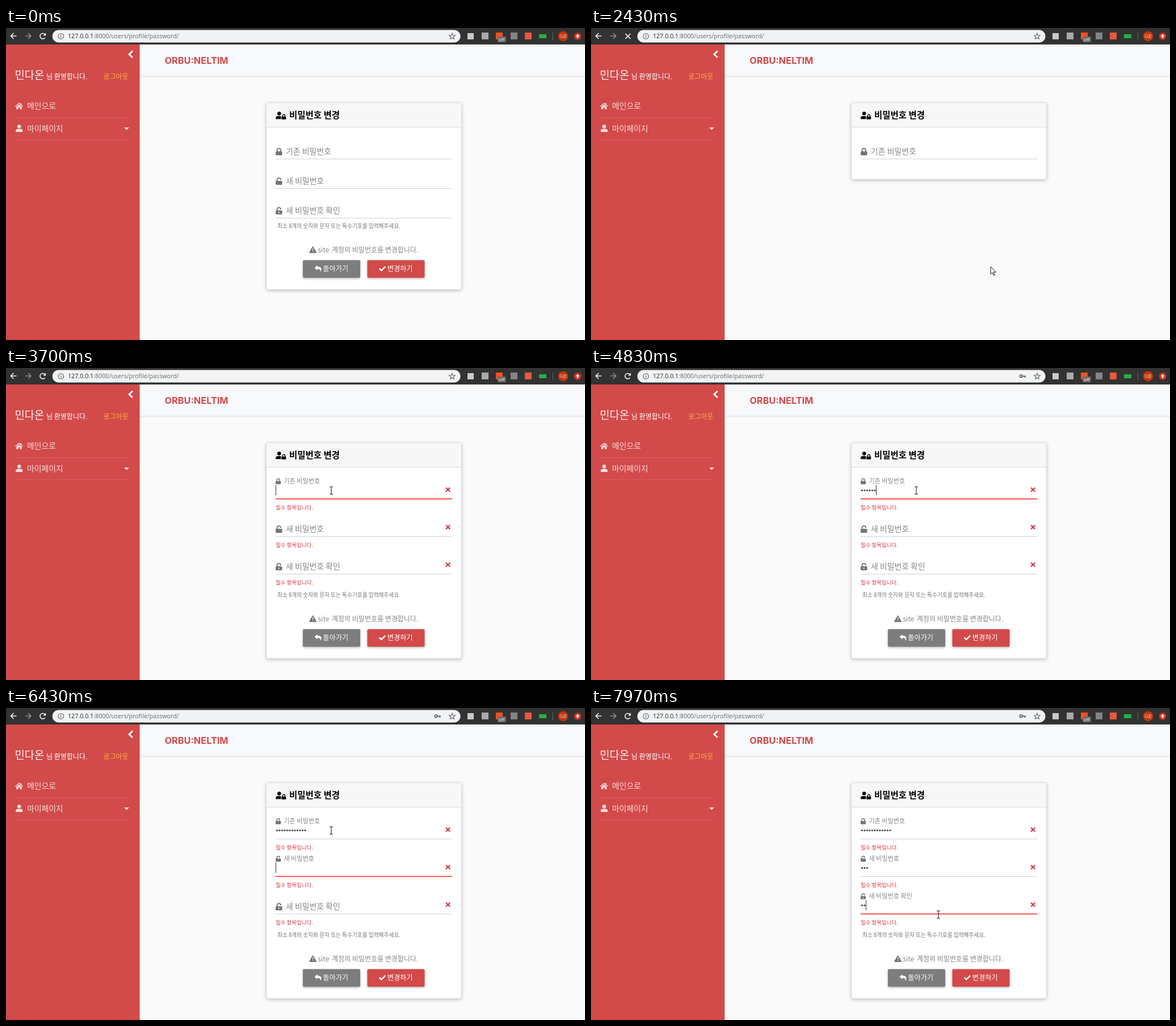
Recreate the animation shown at these times as an HTML page with a canvas. Size 1020 by 549 pixels, loop 8000 ms.

```html
<!DOCTYPE html>
<html lang="ko">
<head>
<meta charset="utf-8">
<title>비밀번호 변경</title>
<style>
html, body { margin: 0; width: 100%; height: 100%; overflow: hidden; background: #fafafa; }
canvas { display: block; }
</style>
</head>
<body>
<canvas id="stage" width="1020" height="549"></canvas>
<script>
const ctx = document.getElementById('stage').getContext('2d');
const LOOP = 8000, TICK = 1000 / 15;
const KR = '"Noto Sans CJK KR", "Noto Sans KR", "Noto Sans CJK", sans-serif';
const LATIN = '"Open Sans", "Noto Sans", sans-serif';
const RED = '#d24a4a', GREY = '#757575', LABEL = '#868686', ERROR = '#dc3545';
const SOFT = 'rgba(255,255,255,.8)';

// timeline, in ms
const FOCUS = [3440, 6140, 7140];
const TYPED = [
  [4030, 4170, 4230, 4370, 4430, 4830, 4970, 5170, 5300, 5370, 5500, 5770],
  [6770, 6830, 6900],
  [7900, 7970]
];
const LABELS = ['기존 비밀번호', '새 비밀번호', '새 비밀번호 확인'];
const POINTER = [
  [503, 954, 460], [968, 704, 420], [2703, 704, 420], [3103, 570, 233],
  [3300, 573, 215.5], [7437, 573, 215.5], [7903, 612, 363.5]
];

const clamp = v => Math.max(0, Math.min(1, v));
const span = (t, from, len) => clamp((t - from) / len);
const easeOut = p => 1 - (1 - p) * (1 - p);
const smooth = p => p * p * (3 - 2 * p);
const mix = (a, b, p) => a + (b - a) * p;

function text(str, x, y, size, color, weight = 400, family = KR, align = 'left') {
  ctx.font = `${weight} ${size}px ${family}`;
  ctx.textAlign = align;
  ctx.fillStyle = color;
  ctx.fillText(str, x, y);
}

function rect(x, y, w, h, color) {
  ctx.fillStyle = color;
  ctx.fillRect(x, y, w, h);
}

function round(x, y, w, h, r, color, shadow) {
  ctx.save();
  if (shadow) {
    ctx.shadowOffsetY = shadow[0];
    ctx.shadowBlur = shadow[1];
    ctx.shadowColor = `rgba(0,0,0,${shadow[2]})`;
  }
  ctx.beginPath();
  ctx.roundRect(x, y, w, h, r);
  ctx.fillStyle = color;
  ctx.fill();
  ctx.restore();
}

function disc(x, y, r, color) {
  ctx.beginPath();
  ctx.arc(x, y, r, 0, 7);
  ctx.fillStyle = color;
  ctx.fill();
}

// fills, strokes or does both with one SVG path
function shape(d, x, y, fill, stroke, width = 1, join = 'miter') {
  const path = new Path2D(d);
  ctx.save();
  ctx.translate(x, y);
  ctx.lineJoin = join;
  ctx.lineWidth = width;
  if (fill) { ctx.fillStyle = fill; ctx.fill(path); }
  if (stroke) { ctx.strokeStyle = stroke; ctx.stroke(path); }
  ctx.restore();
}

function lock(x, y, kind, color) {
  const end = kind ? 'V4.6' : 'V6.5';
  shape('M2.6 6.5V4.1A3.1 3.1 0 0 1 8.9 4.1' + end, x, y, null, color, 1.9);
  round(x, y + 6, 11.5, 7, 1.3, color);
  if (kind === 2) round(x + 5, y + 8, 1.5, 3, .7, '#fff');
}

function person(x, y, color) {
  disc(x + 6.2, y + 3.3, 3.3, color);
  round(x, y + 7.6, 12.4, 5.4, [3.8, 3.8, 1.2, 1.2], color);
}

function browserBar(loading, key) {
  rect(0, 0, 1020, 29, '#323232');
  round(81.7, 3.4, 718.8, 22.2, 11.1, '#f1f3f4');
  shape('M18.5 14H9M13.5 9L8.5 14l5 5', 0, 0, null, '#f4f4f4', 1.6);
  shape('M34 14h9.5M39 9l5 5-5 5', 0, 0, null, '#8c8c8c', 1.6);
  if (loading) {
    shape('M60.5 10l9 9M69.5 10l-9 9', 0, 0, null, '#f4f4f4', 1.7);
  } else {
    shape('M68.6 17.2A4.8 4.8 0 1 1 68.2 10.9', 0, 0, null, '#f4f4f4', 1.6);
    shape('M70.2 8.6v5h-5z', 0, 0, '#f4f4f4');
  }
  ctx.beginPath();
  ctx.arc(96.8, 14.5, 4.8, 0, 7);
  ctx.strokeStyle = '#5f6368';
  ctx.lineWidth = 1.1;
  ctx.stroke();
  rect(96.2, 13.6, 1.2, 3.5, '#5f6368');
  rect(96.2, 11.6, 1.2, 1.2, '#5f6368');

  const host = '127.0.0.1';
  text(host, 109, 18.2, 10.7, '#26282b', 400, LATIN);
  const w = ctx.measureText(host).width;
  text(':8000/users/profile/password/', 109 + w, 18.2, 10.7, '#65696e', 400, LATIN);

  if (key) {
    ctx.beginPath();
    ctx.arc(757.6, 14.3, 2.2, 0, 7);
    ctx.strokeStyle = '#5f6368';
    ctx.lineWidth = 1.8;
    ctx.stroke();
    shape('M760 14.3h6M764.4 14v3', 0, 0, null, '#5f6368', 1.8);
  }
  let star = '';
  for (let i = 0; i < 10; i++) {
    const r = i % 2 ? 2.4 : 5.6, a = i * Math.PI / 5 - Math.PI / 2;
    star += (i ? 'L' : 'M') + r * Math.cos(a) + ' ' + r * Math.sin(a);
  }
  shape(star + 'Z', 786, 14.8, null, '#5f6368', 1.1);

  rect(813, 9, 11, 11, '#c9c9c9');
  rect(838, 8, 12, 12, '#a9a9a9');
  rect(863, 8, 12, 12, '#f4511e');
  round(866, 15, 14.5, 10, 1.5, '#6d6d6d');
  text('off', 873.2, 22.8, 8, '#fff', 400, LATIN, 'center');
  rect(889, 8, 12, 12, '#858585');
  rect(914, 8, 12, 12, '#e8593f');
  rect(939, 11, 13, 7, '#1fb141');
  rect(963, 8, 1, 13, '#6a6a6a');
  disc(981.5, 14.5, 9, '#bf360c');
  text('다온', 981.5, 17, 6.8, '#fff', 400, KR, 'center');
  disc(1007, 14.5, 6.3, '#d93025');
  shape('M1007 10.8l3.4 3.6h-2.1v3.4h-2.6v-3.4h-2.1z', 0, 0, '#fff');
}

function sidebar() {
  rect(0, 29, 235.5, 520, RED);
  shape('M223 40.5L217 46.3l6 5.8', 0, 0, null, '#fff', 2.8);
  text('민다온', 15.5, 89.8, 18.8, 'rgba(255,255,255,.92)', 300);
  text('님 환영합니다.', 71, 90, 12, '#fff');
  text('로그아웃', 171.5, 90, 12, '#ffb43c');
  shape('M0 6.5L7 .6l2.6 2.2V1.2h1.8v3.1L14 6.5l-.9 1L7 2.5.9 7.5z', 16, 131, SOFT);
  shape('M2.2 7.7L7 3.8l4.8 3.9V12H8.4V8.7H5.6V12H2.2z', 16, 131, SOFT);
  text('메인으로', 37, 142.3, 13.9, SOFT, 300);
  person(17, 170, SOFT);
  text('마이페이지', 37, 181.8, 13.9, SOFT, 300);
  shape('M208 175h9l-4.5 4.6z', 0, 0, SOFT);
  rect(16, 157, 200, 1, 'rgba(255,255,255,.12)');
  rect(16, 196, 200, 1, 'rgba(255,255,255,.12)');
}

function card(bottom) {
  const h = bottom - 132;
  round(458.5, 131.5, 344, h + 1, 3.5, '#dcdcdc', [1.5, 6, .25]);
  round(459.3, 132.3, 342.4, h - .6, 3, '#fff');
  round(459.3, 132.3, 342.4, 42, [3, 3, 0, 0], '#f7f7f7');
  rect(459.3, 174, 342.4, 1, '#dcdcdc');
  person(475, 147.3, '#000');
  round(484.2, 152.6, 9.6, 9, 1.5, '#f7f7f7');
  ctx.save();
  ctx.translate(485.2, 151.6);
  ctx.scale(.7, .7);
  lock(0, 0, 0, '#000');
  ctx.restore();
  text('비밀번호 변경', 499, 159, 15.5, '#000', 700);
}

function field(i, line, t, errors) {
  const lift = easeOut(span(t, FOCUS[i], 260));
  const leave = i < 2 ? span(t, FOCUS[i + 1], 260) : 0;
  const size = mix(1, .8, lift);

  rect(475, line - .5, 311, 1, '#ced2d6');
  const glow = lift - leave;
  if (glow > 0) {
    ctx.globalAlpha = glow;
    rect(475, line - 1, 311, 1.8, '#f44336');
    ctx.globalAlpha = 1;
  }

  ctx.save();
  ctx.translate(475, mix(line - 8.2, line - 27.3, lift));
  ctx.scale(size, size);
  lock(0, -11.4, i, GREY);
  text(LABELS[i], 18, 0, 13.9, LABEL, 300);
  ctx.restore();

  const count = TYPED[i].filter(k => k <= t).length;
  for (let n = 0; n < count; n++) disc(477.4 + n * 4.5, line - 15.2, 1.65, '#495057');
  const next = FOCUS[i + 1] || Infinity;
  if (t >= FOCUS[i] && t < next) rect(475 + count * 4.5, line - 24.5, 1, 18, '#333');

  if (errors) {
    shape('M-3.5-3.5l7 7M3.5-3.5l-7 7', 778.6, line - 16.5, null, ERROR, 2.3);
    text('필수 항목입니다.', 475, line + 18, 9.5, ERROR);
  }
}

function button(x, y, color, label, glyph, shadow) {
  round(x, y, 101, 31, 2, color, [1.5, 4, shadow]);
  glyph(x + 20.5, y + 9);
  text(label, x + 35.2, y + 19.3, 12.2, '#fff');
}

const reply = (x, y) => shape(
  'M0 4.5L5 0V2.6C9 2.6 12 3.5 12 7.5C12 9.5 11 10.5 10 11.2C10.8 7.5 9 6.5 5 6.5V9Z', x, y, '#fff');
const check = (x, y) => shape('M.8 5.8L4.3 9.2L11.2 2.4', x, y, null, '#fff', 2.5);

function footer(dy, t) {
  text('최소 8개의 숫자와 문자 또는 특수기호를 입력해주세요.', 478, 351.8 + dy, 9.68, '#70757a');
  shape('M540.6 385.4L546 395H535.2Z', 0, dy, GREY, GREY, 2, 'round');
  rect(540, 387.4 + dy, 1.3, 4, '#fff');
  rect(540, 392.6 + dy, 1.3, 1.4, '#fff');
  text('site', 549.5, 394.8 + dy, 12, LABEL);
  text('계정의 비밀번호를 변경합니다.', 574, 394.8 + dy, 12, LABEL);

  const y = 408.5 + dy, old = dy === 0;
  const hover = old ? span(t, 835, 135) : 0;
  button(523, y, '#7d7d7d', '돌아가기', reply, .28);
  button(636.5, y, RED, '변경하기', (x, top) => {
    if (old) press(y, t);
    check(x, top);
  }, .28 * (1 - hover));
}

function press(y, t) {
  if (t < 1430) return;
  const r = 110 * easeOut(span(t, 1400, 500));
  const g = ctx.createRadialGradient(704, 423, 0, 704, 423, r);
  g.addColorStop(0, 'rgba(255,255,255,.13)');
  g.addColorStop(.7, 'rgba(255,255,255,.17)');
  g.addColorStop(1, 'rgba(255,255,255,.02)');
  ctx.save();
  ctx.beginPath();
  ctx.roundRect(637, y + .5, 100, 30, 2);
  ctx.globalAlpha = 1 - span(t, 1730, 300);
  ctx.fillStyle = g;
  ctx.fill();
  ctx.globalAlpha = 1;
  ctx.strokeStyle = '#c03a40';
  ctx.lineWidth = 1;
  ctx.stroke();
  ctx.restore();
}

function pointer(t) {
  if (t < POINTER[0][0]) return;
  let i = POINTER.findIndex(k => k[0] > t) - 1;
  if (i < 0) i = POINTER.length - 1;
  const a = POINTER[i], b = POINTER[i + 1] || a;
  const p = smooth(span(t, a[0], b[0] - a[0] || 1));
  const x = mix(a[1], b[1], p), y = mix(a[2], b[2], p);
  const overInput = t > 2700 && [230.5, 296.5, 362.5].some(l => y > l - 27 && y < l + 1.5);
  if (overInput) {
    shape('M-3-6.5h2.2l.8.8.8-.8H3M0-6V6M-3 6.5h2.2l.8-.8.8.8H3', x, y, null, '#222', 1.1);
  } else {
    shape('M0 0V13.2L3 10.4L5.2 15.2L7.3 14.3L5.1 9.6H9.3Z', x, y, '#fff', '#111', 1);
  }
}

function draw(t) {
  const partial = t >= 2430 && t < 2500;
  const errors = t >= 2500;
  const dy = errors ? 51 : 0;

  rect(0, 0, 1020, 549, '#fafafa');
  round(238, 29, 790, 55, 0, '#f8f9fb', [1, 3, .15]);
  rect(235, 29, 5, 55, '#f8f9fb');
  text('ORBU:NELTIM', 279.5, 63, 16.3, RED, 700, 'Inter, sans-serif');
  sidebar();

  card(partial ? 266 : 460 + dy);
  const pitch = errors ? 66 : 52;
  for (let i = 0; i < (partial ? 1 : 3); i++) field(i, 230.5 + i * pitch, t, errors);
  if (!partial) footer(dy, t);

  browserBar(t >= 1570 && t < 2630, t >= 4100);
  pointer(t);
}

const start = performance.now();
function loop() {
  const t = (performance.now() - start) % LOOP;
  // the picture advances fifteen times a second
  draw(Math.floor((t - 29) / TICK) * TICK + 37);
  requestAnimationFrame(loop);
}
loop();
</script>
</body>
</html>
```
